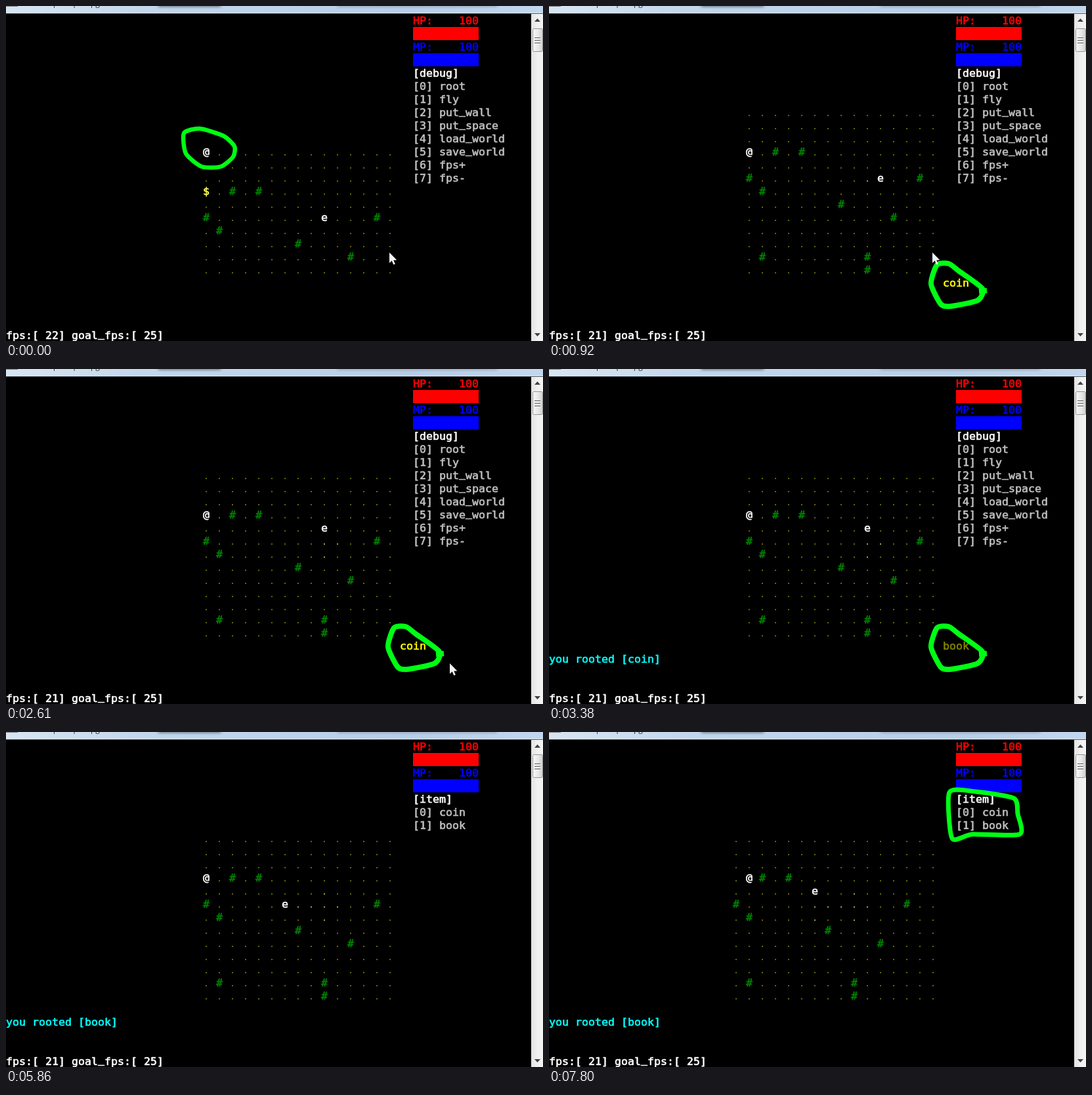
Write an HTML page with a canvas that moves like this. It is 818 px wide and 511 px high and loops after 8000 ms.

```html
<!DOCTYPE html>
<html lang="en">
<head>
<meta charset="utf-8">
<title>Console roguelike</title>
<style>
html, body { margin: 0; width: 100%; height: 100%; overflow: hidden; background: #000; }
canvas { display: block; }
</style>
</head>
<body>
<canvas id="stage" width="818" height="511"></canvas>
<script>
const ctx = document.getElementById('stage').getContext('2d');
const LOOP = 8000, CELL = 20, CHAR = 10, TOP = 12;
const COIN_TAKEN = 520, MESSAGE = 3380, BOOK_TAKEN = 4400, ITEM_MENU = 5860;

// Map cells as [column, row]
const trees = [[2, 3], [4, 3], [0, 5], [13, 5], [1, 6], [7, 7], [11, 8], [1, 11], [9, 11], [9, 12]];
const coinCell = [0, 3];

// Each walk is a start cell and a list of moves: time and direction
const headings = { U: [0, -1], D: [0, 1], L: [-1, 0], R: [1, 0] };
const player = { cell: [0, 0], moves: '130D 380D 520D 7800R' };
const enemy = {
  cell: [9, 5],
  moves: '380R 1210L 1690D 2120U 2520U 3550D 3620L 4170L 4640L 6010U 6260D 6740D 6970U 7650U'
};

// Cursor stops: time, x, y
const cursorStops = [[1130, 584, 376], [1410, 762, 464], [1690, 655, 454], [2520, 655, 454], [2710, 712, 440]];
const CURSOR_STEP = 70;

// Hand-drawn loops
const marks = [
  { from: 0, to: 380, width: 6.5,
    points: [[271, 194], [295, 187], [331, 198], [348, 214], [346, 230], [327, 245], [298, 245], [274, 225]] },
  { from: 610, to: 4470, width: 8, tail: [[655, 435], [667, 434]],
    points: [[591, 395], [609, 393], [624, 404], [660, 431], [653, 449], [612, 458], [597, 455], [582, 424]] },
  { from: 6010, to: LOOP, width: 7,
    points: [[610, 92], [650, 91], [708, 101], [714, 125], [717, 156], [645, 156], [614, 162]] }
];

function path({ cell, moves }, t) {
  const cells = [cell];
  for (const move of moves.split(' ')) {
    if (parseInt(move) > t) break;
    const [x, y] = cells.at(-1), [dx, dy] = headings[move.at(-1)];
    cells.push([x + dx, y + dy]);
  }
  return cells;
}

function cursorAt(t) {
  if (t >= cursorStops.at(-1)[0]) return null;
  const next = cursorStops.findIndex(([time]) => time > t);
  if (next === 0) return cursorStops[0].slice(1);
  const [t0, x0, y0] = cursorStops[next - 1], [t1, x1, y1] = cursorStops[next];
  const elapsed = Math.floor((t - t0) / CURSOR_STEP) * CURSOR_STEP;
  const k = elapsed / (t1 - t0);
  return [Math.round(x0 + (x1 - x0) * k), Math.round(y0 + (y1 - y0) * k)];
}

// Console text is slightly heavy; underscores sit close to the baseline
function text(string, x, row, color) {
  ctx.fillStyle = ctx.strokeStyle = color;
  ctx.lineWidth = .65;
  [...string].forEach((c, i) => {
    const at = [c, x + CHAR * (i + .5), TOP + CELL * row + (c === '_' ? 13 : 16)];
    ctx.fillText(...at);
    ctx.strokeText(...at);
  });
}

function rect(x, y, w, h, color) {
  ctx.fillStyle = color;
  ctx.fillRect(x, y, w, h);
}

function polygon(points, fill) {
  ctx.beginPath();
  points.forEach(([x, y]) => ctx.lineTo(x, y));
  ctx.closePath();
  ctx.fillStyle = fill;
  ctx.fill();
}

function gradient(x0, y0, x1, y1, colors) {
  const g = ctx.createLinearGradient(x0, y0, x1, y1);
  colors.forEach((c, i) => g.addColorStop(i / (colors.length - 1), c));
  return g;
}

function drawTitleBar() {
  rect(0, 0, 818, 11, gradient(0, 0, 818, 0, ['#d8e5f2', '#c3d7eb', '#bdd3ea', '#b7cee7', '#c2d7ed']));
  rect(0, 10, 818, 1, '#dfeaf5');
  rect(0, 11, 818, 1, '#4c5661');
  rect(0, 0, 18, 1, '#777');
  ctx.save();
  ctx.font = '12px "Open Sans", sans-serif';
  ctx.textAlign = 'left';
  ctx.fillStyle = '#333';
  ctx.fillText('prompt - rpg.rb', 72, 0);
  ctx.filter = 'blur(2px)';
  rect(232, -3, 95, 4, '#56636f');
  rect(505, -3, 243, 4, '#8c9eb2');
  ctx.restore();
}

function drawScrollBar() {
  rect(800, 12, 18, 499, gradient(800, 0, 818, 0, ['#e3e3e3', '#f0f0f0', '#f4f4f4']));
  polygon([[805, 24], [809.5, 19], [814, 24]], '#404040');
  polygon([[805, 499], [809.5, 504], [814, 499]], '#404040');
  ctx.beginPath();
  ctx.roundRect(802.5, 34.5, 15, 35, 2);
  ctx.fillStyle = gradient(803, 0, 818, 0, ['#f6f6f6', '#e8e8e8', '#cfcfcf']);
  ctx.fill();
  ctx.strokeStyle = '#949494';
  ctx.lineWidth = 1;
  ctx.stroke();
  for (let y = 48; y < 57; y += 4) {
    rect(805, y, 9, 1, '#555');
    rect(805, y + 1, 9, 1, '#fff');
  }
}

function drawStatus(name, row, color) {
  text(name + ':    100', 620, row, color);
  rect(620, TOP + CELL * (row + 1), 100, CELL, color);
}

function drawMenu(title, items) {
  text(`[${title}]`, 620, 4, '#fff');
  items.split(' ').forEach((item, i) => text(`[${i}] ${item}`, 620, 5 + i, '#c0c0c0'));
}

function drawMap(t) {
  const [px, py] = path(player, t).at(-1);
  const left = 300 - CELL * px, topRow = 10 - py;
  const things = new Map();
  const put = (cell, glyph, color) => things.set(String(cell), [glyph, color]);
  const trail = path(enemy, t);
  const visited = new Set(trail.map(String));
  trees.forEach(cell => put(cell, '#', '#008000'));
  if (t < COIN_TAKEN) put(coinCell, '$', '#ffff55');
  put(trail.at(-1), 'e', '#fff');
  put([px, py], '@', '#fff');

  for (let y = 0; topRow + y < 20; y++) {
    for (let x = 0; left + x * CELL <= 580; x++) {
      const key = String([x, y]), thing = things.get(key), sx = left + x * CELL;
      if (thing) text(thing[0], sx, topRow + y, thing[1]);
      else rect(sx + 4, TOP + CELL * (topRow + y) + 14, 2, 2, visited.has(key) ? '#a0a050' : '#686800');
    }
  }
}

// Closed curve through the points with short handles, so corners stay visible
function drawMark({ points, width, tail }) {
  const n = points.length, point = i => points[(i + n) % n];
  const handle = (i, side) => point(i).map((v, axis) => v + side * (point(i + 1)[axis] - point(i - 1)[axis]) / 9);
  ctx.beginPath();
  ctx.moveTo(...points[0]);
  points.forEach((_, i) => ctx.bezierCurveTo(...handle(i, 1), ...handle(i + 1, -1), ...point(i + 1)));
  ctx.closePath();
  if (tail) {
    ctx.moveTo(...tail[0]);
    ctx.lineTo(...tail[1]);
  }
  ctx.strokeStyle = '#00ff14';
  ctx.lineWidth = width;
  ctx.stroke();
}

function drawCursor([x, y]) {
  const shape = [[0, 0], [0, 16], [3.7, 12.6], [6.3, 18.5], [8.8, 17.4], [6.3, 11.7], [11.3, 11.5]];
  polygon(shape.map(([dx, dy]) => [x + dx, y + dy]), '#f4f4fc');
}

function draw(t) {
  rect(0, 0, 818, 511, '#000');
  ctx.font = '16.6px "DejaVu Sans Mono", monospace';
  ctx.textAlign = 'center';
  ctx.lineJoin = 'round';
  drawTitleBar();
  drawScrollBar();
  drawStatus('HP', 0, '#ff0000');
  drawStatus('MP', 2, '#0000ff');
  if (t < ITEM_MENU) drawMenu('debug', 'root fly put_wall put_space load_world save_world fps+ fps-');
  else drawMenu('item', 'coin book');

  drawMap(t);
  if (t >= COIN_TAKEN && t < MESSAGE) text('coin', 600, 20, '#ffff00');
  if (t >= MESSAGE && t < BOOK_TAKEN) text('book', 600, 20, '#808000');
  if (t >= MESSAGE) text(`you rooted [${t < BOOK_TAKEN ? 'coin' : 'book'}]`, 0, 21, '#00ffff');
  text(`fps:[ ${t < 820 ? 22 : 21}] goal_fps:[ 25]`, 0, 24, '#fff');

  marks.filter(m => t >= m.from && t < m.to).forEach(drawMark);
  const cursor = cursorAt(t);
  if (cursor) drawCursor(cursor);
}

const start = performance.now();
function tick() {
  draw((performance.now() - start) % LOOP);
  requestAnimationFrame(tick);
}
tick();
</script>
</body>
</html>
```
